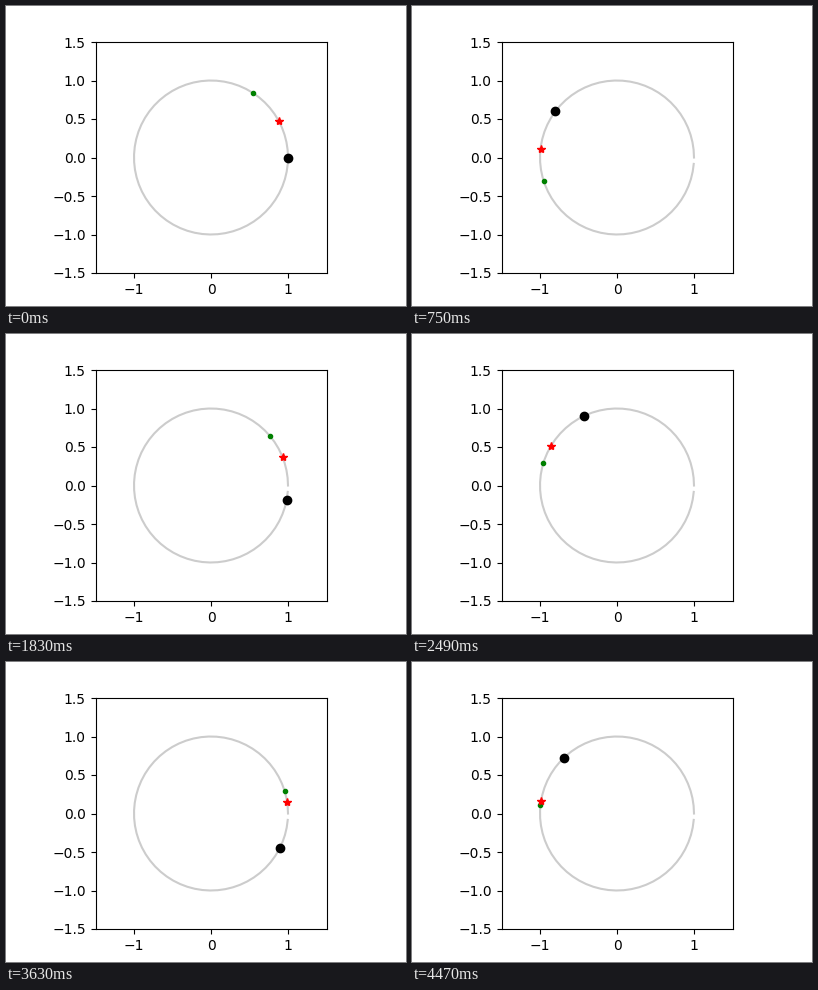
These frames come from a looping animation (400 by 300 pixels, 4500 ms). A matplotlib script:

```python
import numpy as np
import matplotlib.pyplot as plt
from matplotlib.animation import FuncAnimation

FRAMES = 150
INTERVAL = 30  # ms

fig, ax = plt.subplots(figsize=(4, 3), dpi=100)
ax.set_aspect("equal")
ax.set(xlim=(-1.5, 1.5), ylim=(-1.5, 1.5))
ax.set_xticks([-1, 0, 1])
ax.set_yticks(np.arange(-1.5, 1.6, 0.5))

# The orbit stops short of a full turn, leaving a small gap at angle 0.
theta = np.arange(0, 2 * np.pi, 0.1)
ax.plot(np.cos(theta), np.sin(theta), color="0.8")


def body(style, size, phase, speed):
    """A marker on the unit circle with its start angle and step per frame."""
    marker, = ax.plot([np.cos(phase)], [np.sin(phase)], style, markersize=size)
    return marker, phase, speed


bodies = [
    body("ko", 6, 0.0, 0.100),
    body("go", 3, 1.0, 0.098),
    body("r*", 6, 0.5, 0.101),
]


def update(i):
    for marker, phase, speed in bodies:
        angle = phase + speed * i
        marker.set_data([np.cos(angle)], [np.sin(angle)])
    return [marker for marker, _, _ in bodies]


anim = FuncAnimation(fig, update, frames=FRAMES, interval=INTERVAL,
                     init_func=lambda: update(0), repeat=True, repeat_delay=0)

plt.show()
```
